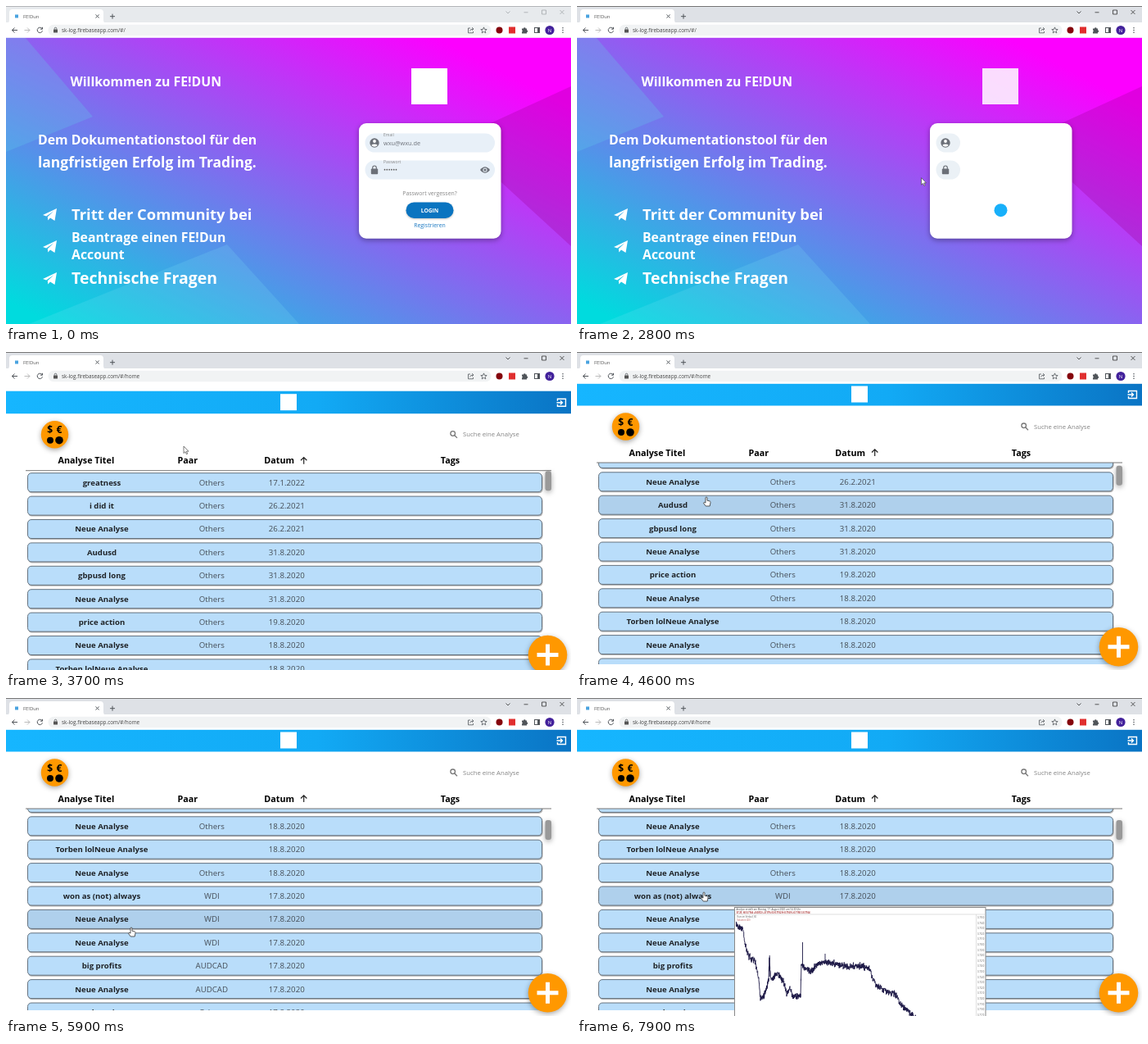
These frames come from a looping animation (690x388 px, 8 s). An HTML page:

```html
<!DOCTYPE html>
<html lang="de">
<head>
<meta charset="utf-8">
<title>FE!Dun</title>
<style>
html,body{margin:0;width:100%;height:100%;overflow:hidden;background:#fff}
svg{display:block;width:100vw;height:100vh;font-family:"Open Sans","Noto Sans",sans-serif}
.ln{fill:none;stroke:#50555a;stroke-width:1}
.thin{stroke-width:.8}
.b{font-weight:700}
.mid{text-anchor:middle}
.shade{filter:drop-shadow(0 2px 3px rgba(0,0,0,.35))}
.soft{filter:drop-shadow(0 1px 1px rgba(0,0,0,.25))}
</style>
</head>
<body>
<svg viewBox="0 0 690 388" xmlns="http://www.w3.org/2000/svg">
<defs>
  <linearGradient id="page" x1="0" y1="1" x2="1" y2="0">
    <stop offset=".04" stop-color="#00dbde"/><stop offset=".88" stop-color="#fc00ff"/>
  </linearGradient>
  <linearGradient id="bar"><stop offset="0" stop-color="#16b6ff"/><stop offset=".55" stop-color="#12aaf5"/><stop offset="1" stop-color="#0a74c4"/></linearGradient>
  <clipPath id="view"><rect y="38" width="690" height="350"/></clipPath>
  <clipPath id="list"><rect x="20" y="135" width="650" height="246"/></clipPath>
  <clipPath id="plot"><rect x="194" y="257" width="293" height="131"/></clipPath>
  <path id="plane" d="M-8.5 1 8.5-7 6 8 .5 4.6-2.2 7.5-2.7 3.2 4.8-3.8-4.3 2.6Z"/>
</defs>
<rect width="690" height="388" fill="#fff"/>

<g clip-path="url(#view)">
  <g id="login">
    <rect y="38" width="690" height="350" fill="url(#page)"/>
    <path d="M0 38H23L106 135 0 178Z" fill="#5fd0e8" opacity=".25"/>
    <path d="M28 388 270 291 358 388Z" fill="#7fe0f0" opacity=".18"/>
    <path d="M690 98 548 163 690 293Z" fill="#a0009a" opacity=".3"/>
    <g fill="#fff" class="b">
      <text x="78.5" y="98.3" font-size="15.8">Willkommen zu FE!DUN</text>
      <text x="39" y="168.8" font-size="15.85">Dem Dokumentationstool für den</text>
      <text x="39" y="196.5" font-size="17.45">langfristigen Erfolg im Trading.</text>
      <text x="80" y="260.5" font-size="18.4">Tritt der Community bei</text>
      <text x="80" y="288" font-size="15.8">Beantrage einen FE!Dun</text>
      <text x="80" y="309" font-size="15.8">Account</text>
      <text x="80" y="339" font-size="19.45">Technische Fragen</text>
      <use href="#plane" x="53.5" y="254"/><use href="#plane" x="53.5" y="293"/><use href="#plane" x="53.5" y="332"/>
    </g>
    <rect id="logo" x="495" y="76" width="44" height="44" fill="#fff"/>
    <rect class="shade" x="431" y="143" width="173.5" height="140.7" rx="9" fill="#fff"/>
    <rect class="pill" x="438.5" y="155.5" height="23" rx="11.5"/>
    <rect class="pill" x="438.5" y="188.5" height="23" rx="11.5"/>
    <g fill="#6c7078">
      <circle cx="450" cy="167" r="5.7"/><circle cx="450" cy="165" r="1.9" fill="#fff"/><path d="M446.3 169.8a4.2 2.6 0 0 1 7.4 0a4.5 4.5 0 0 1-7.4 0" fill="#fff"/>
      <rect x="445.8" y="198.5" width="8.4" height="6.8" rx="1"/><path d="M447.7 199v-1.7a2.3 2.3 0 0 1 4.6 0v1.7" fill="none" stroke="#6c7078" stroke-width="1.2"/>
    </g>
    <g id="fields" fill="#6c7078">
      <text x="461" y="158.7" font-size="5" fill="#888">Email</text>
      <text x="461" y="169.7" font-size="7.3">wxu@wxu.de</text>
      <text x="461" y="191.7" font-size="5" fill="#888">Passwort</text>
      <path d="M462.5 199.7H478" stroke="#555" stroke-width="1.7" stroke-linecap="round" stroke-dasharray="0 2.8"/>
      <path d="M579 200Q585 192.5 591 200Q585 207.5 579 200"/><circle cx="585" cy="200" r="2.6" fill="#e8f0f8"/><circle cx="585" cy="200" r="1.6"/>
      <text class="mid" x="517.5" y="230.8" font-size="6.9" fill="#888">Passwort vergessen?</text>
      <text class="mid" x="517.5" y="270" font-size="6.9" fill="#1a78c2">Registrieren</text>
    </g>
    <rect id="btn"/>
    <text id="btnText" class="mid b" x="517.5" y="251.7" font-size="6.7" fill="#fff">LOGIN</text>
  </g>
  <path id="wipe" fill="#fff"/>

  <g id="home">
    <rect y="38" width="690" height="350" fill="#fff"/>
    <rect y="38" width="690" height="27.5" fill="url(#bar)"/>
    <rect x="335" y="41.5" width="20" height="20" fill="#fff"/>
    <path d="M673.5 50V47.5H683.5V56.5H673.5V54M672.5 52H679.5M677 49.5 679.5 52 677 54.5" fill="none" stroke="#fff" stroke-width="1.4"/>
    <circle class="shade" cx="59.5" cy="91" r="16.7" fill="#ff9800"/>
    <g class="b mid" font-size="12"><text x="53.8" y="89.5">$</text><text x="65" y="89.5">€</text></g>
    <circle cx="54" cy="98" r="4"/><circle cx="65" cy="98" r="4.8"/>
    <g fill="none" stroke="#777" stroke-width="1.3"><circle cx="545.7" cy="89.8" r="2.8"/><path d="M547.8 92 551 95.2"/></g>
    <text x="558" y="93.7" font-size="7.73" fill="#858585">Suche eine Analyse</text>
    <g class="b" font-size="10.75">
      <text x="63.5" y="126.5">Analyse Titel</text><text x="209.5" y="126.5">Paar</text>
      <text x="315.3" y="126.5">Datum</text><text x="530.8" y="126.5">Tags</text>
    </g>
    <path d="M363.7 127V118.8M360 122.5 363.7 118.8 367.4 122.5" fill="none" stroke="#222" stroke-width="1.2"/>
    <g clip-path="url(#list)"><g id="rows"></g></g>
    <path d="M24 135H666" stroke="#777"/>
    <rect id="thumb" x="658.5" width="7.5" height="24" rx="3" fill="#999" class="shade"/>
    <g id="chart">
      <rect x="192.5" y="255.5" width="306.5" height="140" fill="#fff" stroke="#888"/>
      <text x="194.5" y="259.4" font-size="2.9" fill="#444">Analyse erstellt am Montag, 17. August 2020 um 14:30 Uhr</text>
      <text x="194.5" y="262.6" font-size="2.7" fill="#a33" class="b">37.25, 60 0.7164 +0.0012 (+0.17%) O:0.7152 H:0.7169 L:0.7150 C:0.7164</text>
      <text x="195.5" y="268" font-size="2.7" fill="#555">Kurs im Verlauf, 60</text>
      <text x="195.5" y="271.5" font-size="2.6" fill="#b55">Volumen (20)</text>
      <path d="M193 264H499M487.5 264V388" stroke="#ccc" stroke-width=".6"/>
      <g id="scale" font-size="2.7" fill="#666"></g>
      <g clip-path="url(#plot)"><path id="price" fill="none" stroke="#1c1846" stroke-width=".9"/></g>
    </g>
    <circle class="shade" cx="661.5" cy="359.8" r="23.8" fill="#ff9800"/>
    <path d="M661.5 346.8V372.8M648.5 359.8H674.5" stroke="#fff" stroke-width="5"/>
  </g>
</g>

<g id="chrome">
  <rect id="strip" width="690" height="20.5"/>
  <rect id="edge" width="690" height="1"/>
  <path d="M1 20.5Q4 20.5 4 17V8Q4 4 8 4H115Q119 4 119 8V17Q119 20.5 122 20.5Z" fill="#fff"/>
  <rect y="20" width="690" height="18.8" fill="#fff"/>
  <rect x="11" y="10.5" width="4" height="4" fill="#4aa3e0"/>
  <text x="21" y="14.6" font-size="5.9" fill="#555">FE!Dun</text>
  <path class="ln" d="M109.5 10.5 113.5 14.5M113.5 10.5 109.5 14.5M130 9.7V15.7M127 12.7H133"/>
  <path class="ln" d="M14 29.5H7.5M10.5 26.5 7.5 29.5 10.5 32.5"/>
  <path class="ln" d="M22.5 29.5H29M26 26.5 29 29.5 26 32.5" style="stroke:#bbb"/>
  <path class="ln" d="M44 27.5A3.2 3.2 0 1 0 44.5 30.3M44.5 25.8V28.2H42"/>
  <rect x="51.5" y="22.8" width="541" height="13.4" rx="6.7" fill="#f1f3f4"/>
  <rect x="58" y="28.6" width="5" height="4" rx=".5" fill="#555"/><path class="ln thin" d="M59.2 28.6V27.5a1.3 1.3 0 0 1 2.6 0V28.6"/>
  <text id="url" x="68" y="31.8" font-size="6.4" fill="#444"></text>
  <path class="ln thin" d="M567 27H564.5V32.8H570.5V31M566.5 30.5Q567 28 570.5 28M569 26.2 571 28 569 29.8"/>
  <path class="ln thin" d="M583.5 25.9 584.5 28.4 587.2 28.6 585.1 30.3 585.8 32.9 583.5 31.5 581.2 32.9 581.9 30.3 579.8 28.6 582.5 28.4Z"/>
  <circle cx="602.5" cy="29.5" r="4" fill="#85050d"/>
  <rect x="614" y="25.5" width="8" height="8" fill="#e02f2f"/>
  <path d="M630 27.5H632A1.3 1.3 0 0 1 634.6 27.5H636V29.5A1.2 1.2 0 0 1 636 32V33.5H630V31.5A1.2 1.2 0 0 0 630 29.3Z" fill="#50555a"/>
  <rect class="ln" x="645.5" y="26.5" width="6" height="6"/><rect x="649" y="26.5" width="2.5" height="6" fill="#50555a"/>
  <circle cx="664" cy="29.5" r="5.6" fill="#42219b"/><text class="mid" x="664" y="31.7" font-size="6" fill="#fff">N</text>
  <g fill="#50555a"><circle cx="680" cy="26.7" r=".8"/><circle cx="680" cy="29.5" r=".8"/><circle cx="680" cy="32.3" r=".8"/></g>
  <path id="controls" class="thin" d="M610.5 6.5 613 9 615.5 6.5M632.5 7.8H637.5M654.5 5H659.5V10H654.5ZM676.5 5 681.5 10M681.5 5 676.5 10" fill="none"/>
</g>

<path id="arrow" d="M0 0V8.5L2 6.7 3.4 9.8 4.7 9.2 3.4 6.2H6Z" fill="#fff" stroke="#444" stroke-width=".7"/>
<path id="hand" d="M-1 1A1 1 0 0 1 1 1V4.2L4.3 5Q5.3 5.4 5 6.7L4.2 11H-.8L-3.6 7.2Q-3.3 5.8-1 7Z" fill="#fff" stroke="#333" stroke-width=".8"/>
</svg>

<script>
const LOOP = 8000, PITCH = 28.4, FIRST = 149.5;
const $ = id => document.getElementById(id);
const set = (el, attrs) => { for (const k in attrs) el.setAttribute(k, attrs[k]); };
const show = (el, on) => { el.style.display = on ? '' : 'none'; };
const ramp = (t, a, b) => Math.min(1, Math.max(0, (t - a) / (b - a)));
const smooth = p => p * p * (3 - 2 * p);
const mix = (a, b, p) => a + (b - a) * p;
const blend = (a, b, p) => `rgb(${a.map((v, i) => Math.round(mix(v, b[i], p)))})`;

const entries = `greatness|Others|17.1.2022
i did it|Others|26.2.2021
Neue Analyse|Others|26.2.2021
Audusd|Others|31.8.2020
gbpusd long|Others|31.8.2020
Neue Analyse|Others|31.8.2020
price action|Others|19.8.2020
Neue Analyse|Others|18.8.2020
Torben lolNeue Analyse||18.8.2020
Neue Analyse|Others|18.8.2020
won as (not) always|WDI|17.8.2020
Neue Analyse|WDI|17.8.2020
Neue Analyse|WDI|17.8.2020
big profits|AUDCAD|17.8.2020
Neue Analyse|AUDCAD|17.8.2020
Im learning|Others|17.8.2020`.split('\n').map(s => s.split('|'));

$('rows').innerHTML = entries.map(([title, pair, date], i) => {
  const y = FIRST + i * PITCH;
  return `<rect x="27" y="${y - 10.5}" width="628.5" height="23.5" rx="4.5" fill="#777" opacity=".55"/>
    <rect class="row" x="26.5" y="${y - 11.5}" width="628" height="23" rx="4.5" stroke="#66737f"/>
    <text class="mid b" x="117" y="${y + 3.5}" font-size="9.6" fill="#1f2327">${title}</text>
    <text class="mid" x="251.3" y="${y + 3.5}" font-size="9.7" fill="#444c55">${pair}</text>
    <text x="320.8" y="${y + 3.5}" font-size="9.7" fill="#444c55">${date}</text>`;
}).join('');
const rowEls = [...document.querySelectorAll('.row')];
const pills = [...document.querySelectorAll('.pill')];

// Price curve: a few anchors with seeded jitter between them
const anchors = [[193,275],[203,282],[205,300],[210,315],[218,322],[222,345],[224,366],[228,364],[234,345],
  [235,318],[237,345],[245,335],[252,345],[256,360],[260,352],[263,363],[273,363],[274,325],[285,335],[292,325],
  [302,322],[312,323],[330,328],[345,326],[358,331],[361,342],[366,351],[380,358],[390,362],[395,373],[403,380],[414,392]];
let seed = 7;
const rnd = () => (seed = seed * 16807 % 2147483647) / 2147483647;
let d = '';
for (let i = 1; i < anchors.length; i++) {
  const [x0, y0] = anchors[i - 1], [x1, y1] = anchors[i];
  const n = Math.max(2, Math.round((x1 - x0) * 1.6));
  for (let k = 0; k < n; k++) {
    const y = mix(y0, y1, k / n) + (rnd() - .5) * 3.5;
    const x = mix(x0, x1, k / n).toFixed(1);
    d += `${d ? 'L' : 'M'}${x} ${(y - rnd() * 3).toFixed(1)}V${(y + rnd() * 4).toFixed(1)}`;
  }
}
set($('price'), { d: d + 'M275.5 328V298M303 324V312M235.2 340V314' });
$('scale').innerHTML = Array.from({ length: 19 }, (_, i) =>
  `<text x="489" y="${269 + i * 6.6}">${(0.735 - i * 0.001).toFixed(4)}</text>`).join('');

// Pointer stops: time, x, y
const path = [[550,628,328],[800,628,328],[1350,519,247],[1600,519,247],[2100,472,232],[2700,430,215],
  [3300,304,144],[3700,217,115],[4200,158,177],[5300,158,177],[5850,153,280],[6150,153,280],[6550,155,237],[8000,155,237]];
function pointer(t) {
  let i = 1;
  while (i < path.length - 1 && t > path[i][0]) i++;
  const [t0, x0, y0] = path[i - 1], [t1, x1, y1] = path[i];
  const p = smooth(ramp(t, t0, t1));
  return [mix(x0, x1, p), mix(y0, y1, p)];
}

function drawLogin(t) {
  const p = smooth(ramp(t, 1550, 1950));
  const pulse = Math.cos((t - 2100) / 600 * 2 * Math.PI);
  pills.forEach(el => set(el, { width: mix(158.5, 29.5, p), fill: blend([232,240,248], [235,241,246], p) }));
  set($('fields'), { opacity: 1 - ramp(t, 1550, 1750) });
  set($('btnText'), { opacity: 1 - ramp(t, 1550, 1700) });
  const size = 17 + (pulse - 1) * 2 * ramp(t, 1950, 2100);
  const w = mix(58, size, p), h = mix(19.5, size, p);
  set($('btn'), { x: 517.5 - w / 2, y: 249.2 - h / 2, width: w, height: h, rx: h / 2,
    fill: blend([10,116,192], [24,176,250], p), class: p < 1 ? 'soft' : '' });
  set($('logo'), { opacity: 1 - .15 * ramp(t, 1600, 2100) });
  const half = 172 * (Math.max(0, t - 2800) / 500) ** 2;
  set($('wipe'), { d: `M0 ${332.5 - half}L690 ${173.5 - half}V${173.5 + half}L0 ${332.5 + half}Z` });
}

function drawHome(t, x, y) {
  const shift = 270 * (1 - ramp(t, 3500, 3800)) ** 3;
  const scroll = [4350, 4700, 5050, 5400].reduce((s, a) => s + 48 * smooth(ramp(t, a, a + 220)), 0);
  set($('home'), { transform: `translate(0 ${shift})` });
  set($('rows'), { transform: `translate(0 ${-scroll})` });
  set($('thumb'), { y: 135.5 + scroll * .07 });
  let over = false;
  rowEls.forEach((el, i) => {
    const gap = Math.abs(y - shift + scroll - FIRST - i * PITCH);
    const hit = gap < 11.5 && y - shift > 136;
    over = over || hit;
    set(el, { fill: hit ? '#afd0ec' : '#b9ddfa' });
  });
  set($('chart'), { opacity: ramp(t, 6750, 6950) });
  return over;
}

function draw(t) {
  const home = t >= 3500, active = t >= 1450, [x, y] = pointer(t);
  show($('login'), !home); show($('wipe'), !home && t > 2800); show($('home'), home);
  let hand = t > 1200 && t < 1650;
  if (home) hand = drawHome(t, x, y); else drawLogin(t);
  $('url').textContent = 'sk-log.firebaseapp.com/#/' + (home ? 'home' : '');
  set($('controls'), { stroke: active ? '#333' : '#a4a7ab' });
  set($('strip'), { fill: active ? '#dee1e6' : '#e7eaed' });
  set($('edge'), { fill: active ? '#777' : '#b4b6b9' });
  for (const id of ['arrow', 'hand']) {
    show($(id), t >= 550 && (id === 'hand') === hand);
    set($(id), { transform: `translate(${x} ${y})` });
  }
}

function tick() {
  draw(performance.now() % LOOP);
  requestAnimationFrame(tick);
}
tick();
</script>
</body>
</html>
```
